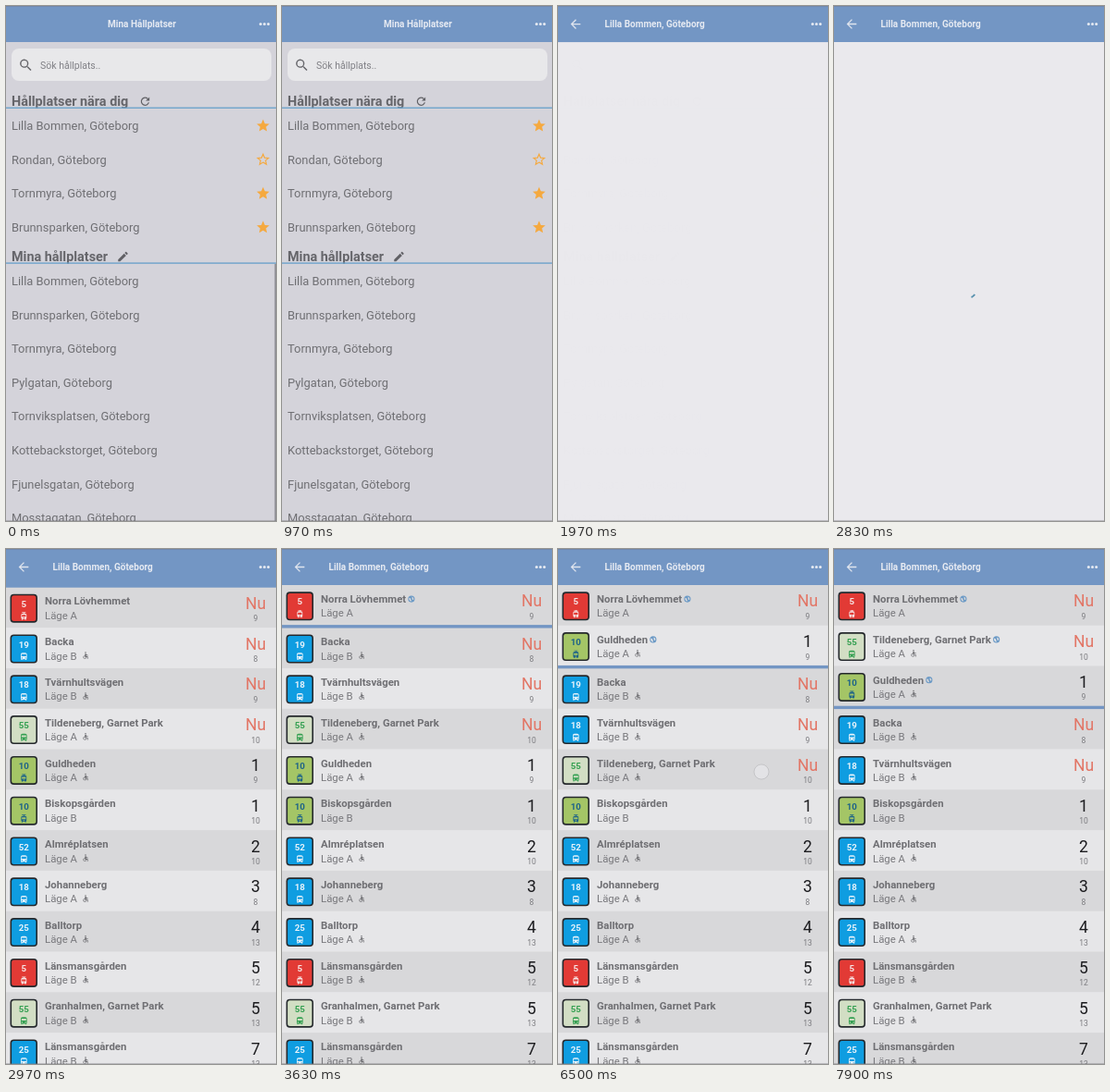
Write an HTML page with a canvas that moves like this. It is 292x557 px and loops after 8 s.

```html
<!DOCTYPE html>
<html lang="sv">
<head>
<meta charset="utf-8">
<title>Hållplatser</title>
<style>
html, body { margin: 0; width: 100%; height: 100%; overflow: hidden; background: #d4d3da; }
canvas { display: block; width: 292px; height: 557px; }
</style>
</head>
<body>
<canvas id="stage"></canvas>
<script>
const W = 292, H = 557, LOOP = 8000, BAR = 39, ROW = 43.8;
const BLUE = '#7396c4', GREY = '#6f6f73', ORANGE = '#f5a93f';
const canvas = document.getElementById('stage');
const c = canvas.getContext('2d');
const dpr = window.devicePixelRatio || 1;
canvas.width = W * dpr;
canvas.height = H * dpr;

// Icons on a 24 unit grid
const icons = {
  back: 'M20 11H7.8l5.6-5.6L12 4l-8 8 8 8 1.4-1.4L7.8 13H20z',
  search: 'M15.5 14h-.8l-.3-.3a6.5 6.5 0 1 0-.7.7l.3.3v.8l5 5 1.5-1.5zM9.5 14a4.5 4.5 0 1 1 0-9 4.5 4.5 0 0 1 0 9z',
  refresh: 'M17.65 6.35A8 8 0 1 0 19.73 14h-2.08A6 6 0 1 1 16.2 7.8L13 11h7V4z',
  pencil: 'M3 17.25V21h3.75L17.8 9.94 14.06 6.19zM20.7 7.04a1 1 0 0 0 0-1.41L18.37 3.3a1 1 0 0 0-1.41 0l-1.83 1.83 3.75 3.75z',
  star: 'M12 17.3l6.2 3.7-1.6-7 5.4-4.7-7.2-.6L12 2 9.2 8.7 2 9.3 7.4 14 5.8 21z',
  bus: 'M4 16c0 .9.4 1.7 1 2.2V20a1 1 0 0 0 1 1h1a1 1 0 0 0 1-1v-1h8v1a1 1 0 0 0 1 1h1a1 1 0 0 0 1-1v-1.8c.6-.5 1-1.3 1-2.2V6c0-3.5-3.6-4-8-4s-8 .5-8 4zM6 6h12v5H6zM6 15.5a1.5 1.5 0 1 0 3 0a1.5 1.5 0 1 0-3 0M15 15.5a1.5 1.5 0 1 0 3 0a1.5 1.5 0 1 0-3 0',
  tram: 'M19 17V8.5c0-2.6-2.6-3.3-6-3.4l.8-1.6H17V2H7v1.5h4.8L11 5.1C7.9 5.2 5 5.9 5 8.5V17c0 1.5 1.2 2.6 2.6 2.9L6 21.5V22h2.2l2-2H14l2 2h2v-.5L16.5 20c1.7 0 2.5-1.4 2.5-3zM7 9h10v5H7zM10.5 17a1.5 1.5 0 1 0 3 0a1.5 1.5 0 1 0-3 0',
  chair: 'M10 4a2 2 0 1 0 4 0a2 2 0 1 0-4 0M19 13v-2c-1.5 0-3-.7-4-1.8l-1.3-1.4C13 7.2 12.3 7 12 7c-1.1 0-2 .9-2 2v6c0 1.1.9 2 2 2h5v5h2v-5.5c0-1.1-.9-2-2-2h-3v-3.5c1.3 1 3.2 1.9 5 2zM12.8 18a3 3 0 1 1-3.8-3.8V12.1a5 5 0 1 0 5.9 5.9z',
  globe: 'M12 2a10 10 0 1 0 0 20a10 10 0 1 0 0-20M5 8l5 2v3l2 3v3c-4 0-7-3-7-7zM14 5l4 3 1 5-3 2-2-4z'
};
for (const name in icons) icons[name] = new Path2D(icons[name]);

const city = name => name + ', Göteborg';
const nearby = ['Lilla Bommen', 'Rondan', 'Tornmyra', 'Brunnsparken'].map(city);
const saved = ['Lilla Bommen', 'Brunnsparken', 'Tornmyra', 'Pylgatan', 'Tornviksplatsen',
  'Kottebackstorget', 'Fjunelsgatan', 'Mosstagatan'].map(city);

// Line number: fill, ink, icon
const lines = {
  5: ['#e23a35', '#f6e4e4', 'tram'],
  10: ['#a4c566', '#1d6388', 'tram'],
  18: ['#0f9de1', '#e6f2fa', 'bus'],
  19: ['#0f9de1', '#e6f2fa', 'bus'],
  25: ['#0f9de1', '#e6f2fa', 'bus'],
  52: ['#0f9de1', '#e6f2fa', 'bus'],
  55: ['#d2dec4', '#35a052', 'bus']
};

// Line, destination, platform, accessible, minutes, next; optional time of pinning
const departures = [
  [5, 'Norra Lövhemmet', 'A', 0, 'Nu', 9, 3570],
  [19, 'Backa', 'B', 1, 'Nu', 8],
  [18, 'Tvärnhultsvägen', 'B', 1, 'Nu', 9],
  [55, 'Tildeneberg, Garnet Park', 'A', 1, 'Nu', 10, 6700],
  [10, 'Guldheden', 'A', 1, 1, 9, 5000],
  [10, 'Biskopsgården', 'B', 0, 1, 10],
  [52, 'Almréplatsen', 'A', 1, 2, 10],
  [18, 'Johanneberg', 'A', 1, 3, 8],
  [25, 'Balltorp', 'A', 1, 4, 13],
  [5, 'Länsmansgården', 'B', 1, 5, 12],
  [55, 'Granhalmen, Garnet Park', 'B', 1, 5, 13],
  [25, 'Länsmansgården', 'B', 1, 7, 13]
];

// Touches: start, end, x, y
const taps = [[1500, 1800, 62, 129], [3370, 3570, 140, 62], [4800, 5000, 134, 240], [6500, 6700, 220, 241]];
const OPEN = 1720, OPENED = OPEN + 350, LOADED = 2900;

const clamp = v => Math.max(0, Math.min(1, v));
const ramp = (t, from, to) => clamp((t - from) / (to - from));

function rect(x, y, w, h, fill) {
  c.fillStyle = fill;
  c.fillRect(x, y, w, h);
}

function box(x, y, w, h, r, fill) {
  c.beginPath();
  c.roundRect(x, y, w, h, r);
  c.fillStyle = fill;
  c.fill();
}

// y is the middle of the capitals
function text(s, x, y, size, color, weight = 400, align = 'left') {
  c.font = `${weight} ${size}px Roboto, sans-serif`;
  c.textAlign = align;
  c.fillStyle = color;
  c.fillText(s, x, y + size * 0.355);
  return c.measureText(s).width;
}

function icon(name, x, y, size, color, outline) {
  c.save();
  c.translate(x, y);
  c.scale(size / 24, size / 24);
  c.translate(-12, -12);
  c.fillStyle = c.strokeStyle = color;
  c.lineWidth = 2;
  if (outline) c.stroke(icons[name]);
  else c.fill(icons[name], 'evenodd');
  c.restore();
}

function faded(alpha, draw) {
  c.save();
  c.globalAlpha *= alpha;
  draw();
  c.restore();
}

function header(title, x, align) {
  rect(0, 0, W, BAR, BLUE);
  rect(0, 0, W, 1, '#7288ad');
  text(title, x, 19.5, 10, '#e6eaf2', 700, align);
  for (const dx of [-4.2, 0, 4.2]) {
    c.beginPath();
    c.arc(279.5 + dx, 19.5, 1.5, 0, 7);
    c.fillStyle = '#e6eaf2';
    c.fill();
  }
}

function heading(s, y, name, x) {
  text(s, 6, y, 14.4, '#65656a', 700);
  icon(name, x, y + 0.5, 14, '#606065');
  rect(0, y + 6.8, W, 1.4, '#6ea3cb');
}

function stopsScreen(t) {
  rect(0, 0, W, H, '#d4d3da');
  header('Mina Hållplatser', 147, 'center');
  box(6, 46, 281, 35, 8, '#e8e8ea');
  icon('search', 21.5, 64, 17, '#66666a');
  text('Sök hållplats..', 37, 64, 10.5, '#808086');
  heading('Hållplatser nära dig', 102.7, 'refresh', 150.5);
  nearby.forEach((name, i) => {
    const y = 129.4 + 36.6 * i;
    faded(i ? 1 : 1 - 0.75 * ramp(t, 1500, 1650), () => {
      text(name, 6, y, 12.9, GREY);
      icon('star', 278, y, i == 1 ? 14 : 16.4, ORANGE, i == 1);
    });
  });
  heading('Mina hållplatser', 270.6, 'pencil', 126.5);
  saved.forEach((name, i) => text(name, 6, 297.4 + 36.6 * i, 12.9, GREY));
  faded(1 - ramp(t, 700, 970), () => rect(290.5, 279, 1.5, 278, '#8e8e94'));
}

function departure([line, name, platform, accessible, minutes, next, pinTime], top, dark, pinned, t) {
  const [fill, ink, vehicle] = lines[line];
  const y = top + 15;
  rect(0, top, W, ROW + 0.3, dark ? '#d8d8da' : '#e6e6e8');
  const press = pinTime && t < pinTime ? ramp(t, pinTime - 130, pinTime) : 0;
  faded(1 - 0.7 * press, () => {
    box(4.5, y - 7.6, 29.5, 31, 4, '#24282c');
    box(6.1, y - 6, 26.3, 27.8, 2.5, fill);
    text(line, 19.3, y + 3, 9.7, ink, 700, 'center');
    icon(vehicle, 19.3, y + 16.2, 10, ink);
    const w = text(name, 42, y, 11.4, GREY, 700);
    if (pinned) icon('globe', 42 + w + 5.8, y + 0.2, 8.6, '#6c9ac6');
    text('Läge ' + platform, 42, y + 15.5, 11.4, '#78787c');
    if (accessible) icon('chair', 86, y + 15, 9, '#66666a');
    const now = minutes == 'Nu';
    text(minutes, 270, y + 2.2, 17.5, now ? '#e27565' : '#1c1c1f', 400, 'center');
    text(next, 270, y + 18.8, 8.5, '#7b7b7f', 400, 'center');
  });
}

function departureList(t) {
  const isPinned = d => t >= d[6];
  const pinned = departures.filter(isPinned);
  const rest = departures.filter(d => !isPinned(d));
  const first = 38.9, split = first + ROW * pinned.length;
  rest.forEach((d, i) => departure(d, split + 2.4 + ROW * i, i % 2 == 0, false, t));
  pinned.forEach((d, i) => departure(d, first + ROW * i, i % 2 == 0, true, t));
  rect(0, split - 0.6, W, 3.4, BLUE);
}

function spinner(t) {
  const turns = (t - 2830) / 1333, lap = Math.floor(turns), p = turns - lap;
  const ease = x => x * x * (3 - 2 * x);
  const base = 0.5 + turns * 1.6 + lap * 4.7;
  const tail = base + 4.7 * ease(ramp(p, 0.5, 1));
  const head = base + 0.7 + 4.7 * ease(ramp(p, 0, 0.5));
  c.beginPath();
  c.arc(146, 308.5, 7, tail, head);
  c.lineWidth = 2;
  c.strokeStyle = '#5790ae';
  c.stroke();
}

// The layers fade one by one, so the old bar shines through pale
function stopScreen(t) {
  const p = 1 - (1 - ramp(t, OPEN, OPENED)) ** 5;
  const alpha = p < 0.5 ? p * 0.6 : p < 0.9 ? 0.3 + (p - 0.5) : 0.7 + (p - 0.9) * 3;
  c.save();
  c.globalAlpha = alpha;
  c.translate(0, (1 - p) * 0.08 * H);
  rect(0, 0, W, H, '#eae9ed');
  if (t >= LOADED) departureList(t);
  else if (t >= OPENED) spinner(t);
  header('Lilla Bommen, Göteborg', 50.5, 'left');
  icon('back', 19, 19.5, 16, '#e0e5ee');
  c.restore();
}

function touch([from, to, x, y], t) {
  if (t < from || t >= to) return;
  c.beginPath();
  c.arc(x, y, 8, 0, 7);
  c.fillStyle = 'rgba(238,238,241,.5)';
  c.fill();
  c.lineWidth = 0.8;
  c.strokeStyle = 'rgba(130,130,135,.35)';
  c.stroke();
}

function frame(now) {
  const t = now % LOOP;
  c.setTransform(dpr, 0, 0, dpr, 0, 0);
  if (t < OPENED) stopsScreen(t);
  if (t >= OPEN) stopScreen(t);
  taps.forEach(tap => touch(tap, t));
  rect(0, H - 1, W, 1, 'rgba(120,120,125,.4)');
  requestAnimationFrame(frame);
}
requestAnimationFrame(frame);
</script>
</body>
</html>
```
